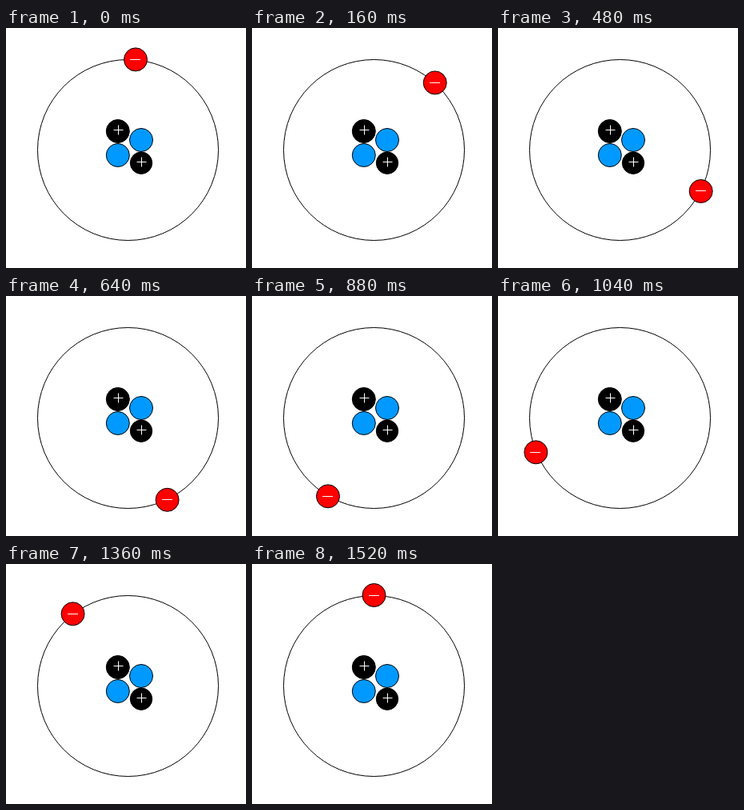
An HTML page for the animation above (1600 ms loop, 300 px wide and 300 px high).

```html
<!DOCTYPE html>
<html lang="en">
<head>
<meta charset="utf-8">
<title>Atom</title>
<style>
  html, body { margin: 0; width: 100%; height: 100%; overflow: hidden; background: #fff; }
  svg { display: block; width: 300px; height: 300px; }
  circle { stroke: #000; }
  path { stroke: #fff; fill: none; }
  .orbit { fill: none; }
  .proton { fill: #000; }
  .neutron { fill: #09f; }
  .electron { fill: #f00; }
  .minus { shape-rendering: crispEdges; }
</style>
</head>
<body>
<svg viewBox="0 0 300 300">
  <circle class="orbit" cx="152.5" cy="152.5" r="113"/>
  <circle class="neutron" cx="169" cy="140" r="14.5"/>
  <circle class="neutron" cx="139.8" cy="159" r="14.5"/>
  <circle class="proton" cx="139.8" cy="129" r="14.5"/>
  <path d="M134.5 127.5h12M140.5 121.5v12"/>
  <circle class="proton" cx="169" cy="168.7" r="13.7"/>
  <path d="M163.5 167.5h12M169.5 161.5v12"/>
  <g id="electron">
    <circle class="electron" r="14.5"/>
    <path class="minus" d="M-7 0h13"/>
  </g>
</svg>
<script>
  const electron = document.getElementById('electron');
  const CENTER = 152.5, RADIUS = 113.5;
  const STEP_MS = 80, STEPS = 20;
  const START_DEG = 4.8, STEP_DEG = (360 - START_DEG) / (STEPS - 1);

  // The electron jumps clockwise in equal steps, measured from the top.
  function draw() {
    const step = Math.floor(performance.now() / STEP_MS) % STEPS;
    const angle = (START_DEG + step * STEP_DEG) * Math.PI / 180;
    const x = CENTER + RADIUS * Math.sin(angle);
    const y = CENTER - RADIUS * Math.cos(angle);
    electron.setAttribute('transform', `translate(${x.toFixed(2)} ${y.toFixed(2)})`);
    requestAnimationFrame(draw);
  }
  draw();
</script>
</body>
</html>
```
